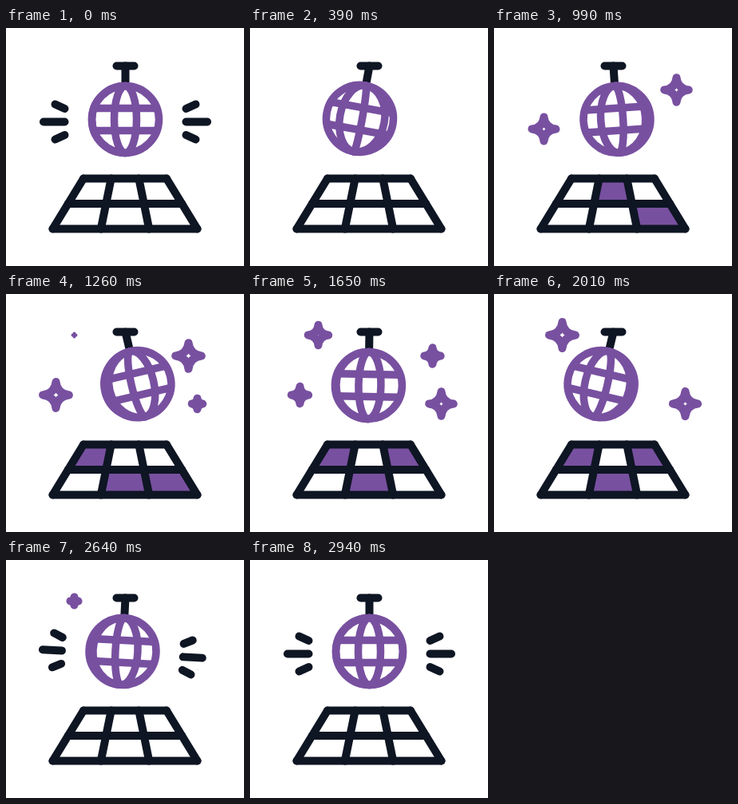
Recreate the animation shown at these times as an HTML page with a canvas. Size 298 by 298 pixels, loop 2.97 s.

```html
<!DOCTYPE html>
<html>
<head>
<meta charset="utf-8">
<style>
html, body { margin: 0; height: 100%; overflow: hidden; background: #fff; }
canvas { display: block; width: 298px; height: 298px; }
</style>
</head>
<body>
<canvas id="stage"></canvas>
<script>
const LOOP = 2970, DARK = '#0e1523', PURPLE = '#7850a0';
const canvas = document.getElementById('stage');
const ctx = canvas.getContext('2d');
const ratio = window.devicePixelRatio || 1;
canvas.width = canvas.height = 298 * ratio;

const ease = p => (1 - Math.cos(Math.PI * Math.min(1, Math.max(0, p)))) / 2;
const mix = (a, b, p) => a + (b - a) * p;

function pen(color, width) {
  ctx.strokeStyle = ctx.fillStyle = color;
  ctx.lineWidth = width;
}

function trace(...points) {
  ctx.beginPath();
  for (const [x, y] of points) ctx.lineTo(x, y);
}

function line(a, b) {
  trace(a, b);
  ctx.stroke();
}

// Swing in degrees: ease out to the side, one full sway, ease back to rest
function swing(t) {
  const first = 570, half = 710, last = first + 2 * half;
  if (t < first) return 13.3 * ease(t / first);
  if (t > last) return 13.3 * ease((2940 - t) / 950);
  return 13.3 * Math.cos(Math.PI * (t - first) / half);
}

function floorPoint(col, row) {
  const half = mix(52, 90.5, row / 2);
  return [148.5 + half * (col * 2 / 3 - 1), 188 + 31.5 * row];
}

// A checkerboard that flips on each beat, sweeping from left to right
function isLit(t, col, row) {
  if (t < 400 || t > 2610) return false;
  const local = t - 180 * col + 50 * row;
  const flips = [410, 1010, 2065].filter(beat => local > beat).length;
  return (col + row + flips) % 2 === 0;
}

function drawFloor(t) {
  pen(PURPLE, 10);
  for (let row = 0; row < 2; row++)
    for (let col = 0; col < 3; col++) {
      if (!isLit(t, col, row)) continue;
      trace(floorPoint(col, row), floorPoint(col + 1, row),
        floorPoint(col + 1, row + 1), floorPoint(col, row + 1));
      ctx.fill();
    }
  pen(DARK, 10);
  for (let row = 0; row < 3; row++) line(floorPoint(0, row), floorPoint(3, row));
  for (let col = 0; col < 4; col++) line(floorPoint(col, 0), floorPoint(col, 2));
}

function drawBall(spin) {
  const radius = 42;
  ctx.save();
  ctx.translate(0, 67);
  ctx.beginPath();
  ctx.arc(0, 0, radius, 0, 7);
  ctx.fillStyle = '#fff';
  ctx.fill();
  pen(PURPLE, 9.5);
  ctx.stroke();
  for (const y of [-14, 14]) line([-39, y], [39, y]);
  for (let k = -2; k < 4; k++) {
    const x = 28 * (k - 0.5 + spin);
    if (Math.abs(x) > radius) continue;
    ctx.beginPath();
    ctx.ellipse(0, 0, Math.abs(x), radius, 0, -Math.PI / 2, Math.PI / 2, x < 0);
    ctx.stroke();
  }
  ctx.restore();
}

function drawRays(t) {
  const size = ease((360 - t) / 300) + ease((t - 2400) / 300);
  if (!size) return;
  pen(DARK, 10);
  for (const side of [-1, 1])
    for (const k of [-1, 0, 1]) {
      const reach = k ? 12 : 26.5;
      line([side * 76, 70 + 16.5 * k],
        [side * (76 + reach * size), 70 + (16.5 + 5.5 * size) * k]);
    }
}

function drawStar(t, x, y, start) {
  const p = (t - start) / 1600;
  if (p <= 0 || p >= 1) return;
  const r = 16.5 * Math.sin(Math.PI * p), c = 0.1 * r;
  ctx.save();
  ctx.translate(x, y);
  pen(PURPLE, 10 * Math.min(1, r / 5));
  ctx.beginPath();
  ctx.moveTo(0, -r);
  ctx.quadraticCurveTo(c, -c, r, 0);
  ctx.quadraticCurveTo(c, c, 0, r);
  ctx.quadraticCurveTo(-c, c, -r, 0);
  ctx.quadraticCurveTo(-c, -c, 0, -r);
  ctx.closePath();
  ctx.stroke();
  ctx.restore();
}

function draw(now) {
  const t = now % LOOP, angle = swing(t);
  ctx.setTransform(ratio, 0, 0, ratio, 0, 0);
  ctx.fillStyle = '#fff';
  ctx.fillRect(0, 0, 298, 298);
  ctx.translate(0.5, 0.5);
  ctx.lineCap = ctx.lineJoin = 'round';
  drawFloor(t);

  ctx.save();
  ctx.translate(149, 47);
  pen(DARK, 10);
  line([-11, 0], [11, 0]);
  ctx.rotate(angle * Math.PI / 180);
  line([0, 0], [0, 22]);
  drawBall(angle / 17);
  drawRays(t);
  ctx.restore();

  drawStar(t, 62, 126, 410);
  drawStar(t, 228, 77, 390);
  drawStar(t, 239, 137, 1045);
  drawStar(t, 85, 51, 1200);
}

const begin = performance.now();
function tick() {
  draw(performance.now() - begin);
  requestAnimationFrame(tick);
}
tick();
</script>
</body>
</html>
```
